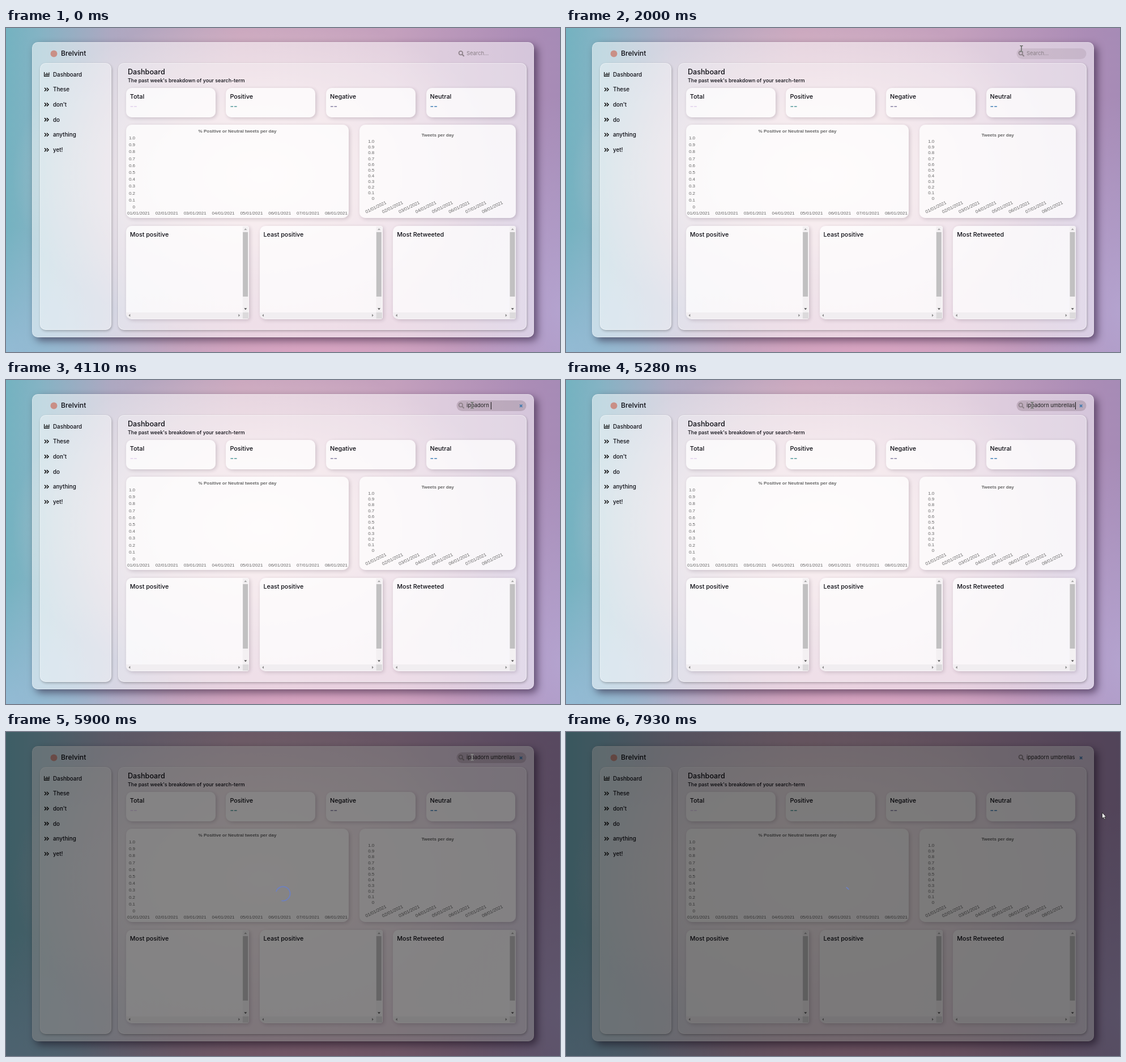
These frames come from a looping animation (978 px wide and 573 px high, 8000 ms). An HTML page:

```html
<!DOCTYPE html>
<html lang="en">
<head>
<meta charset="utf-8">
<title>Dashboard</title>
<style>
html, body { margin: 0; width: 100%; height: 100%; overflow: hidden; }
body {
  background:
    radial-gradient(440px 290px at 450px 260px, #fae0dff0, #f6d8da00),
    radial-gradient(420px 130px at 540px 573px, #e0a5c4b0, #e0a5c400),
    radial-gradient(300px 220px at 0 573px, #9dbddac0, #9dbdda00),
    radial-gradient(200px 380px at 978px 500px, #b7a8d4d0, #b7a8d400),
    linear-gradient(90deg, #74b2c0, #84b3c4 6%, #ada8c1 19%, #c6a2bb 42%, #c4a0bd 70%, #ab8cb6 94%, #a68bb6);
}
.panel, svg, #shade { position: absolute; box-sizing: border-box; }
svg { left: 0; top: 0; overflow: visible; }
.ui { font-family: Inter, "Open Sans", sans-serif; font-weight: 500; }
.chart { font-family: "Liberation Sans", Arial, sans-serif; font-size: 8px; fill: #666; }
.bold { font-weight: 700; }
.search { font-size: 9.4px; font-weight: 400; }
.line { fill: none; stroke: #111; }
#shade { inset: 0; background: #000; }
#beam { mix-blend-mode: difference; }
</style>
</head>
<body>
<svg id="scene" width="978" height="573"></svg>
<div id="shade"></div>
<svg id="spinner" width="978" height="573">
  <circle id="arc" cx="489" cy="286" r="12.6" fill="none" stroke="#6c80c6" stroke-width="1.8" stroke-linecap="round" pathLength="360"/>
</svg>
<svg id="beam" width="8" height="12">
  <path d="M-2.5 .5H-.7L0 1.2 .7 .5H2.5M0 1V10.5M-2.5 11H-.7L0 10.3 .7 11H2.5" fill="none" stroke="#fff"/>
</svg>
<svg id="arrow" width="10" height="14">
  <path d="M.5 .5V11L2.9 8.8 4.6 12.6 6.3 11.9 4.6 8.2H7.6Z" fill="#fff" stroke="#222" stroke-width=".9"/>
</svg>
<script>
const LOOP = 8000;
const $ = id => document.getElementById(id);
const scene = $('scene');

function panel(x, y, w, h, white, extra) {
  const div = document.createElement('div');
  div.className = 'panel';
  div.style.cssText = `left:${x}px;top:${y}px;width:${w}px;height:${h}px;border-radius:10px;` +
    `background:rgba(255,255,255,${white});${extra}`;
  scene.before(div);
}

function add(tag, attrs, content = '') {
  const node = document.createElementNS('http://www.w3.org/2000/svg', tag);
  for (const key in attrs) node.setAttribute(key, attrs[key]);
  node.textContent = content;
  return scene.appendChild(node);
}
const label = (x, y, size, content, fill = '#0b0b12') =>
  add('text', { x, y, fill, class: 'ui', 'font-size': size }, content);
const chartText = (x, y, anchor, content, more) =>
  add('text', { x, y, 'text-anchor': anchor, class: 'chart', ...more }, content);
const rect = (x, y, width, height, fill) => add('rect', { x, y, width, height, fill });
const line = (d, width, stroke = '#111') =>
  add('path', { d, class: 'line', 'stroke-width': width, style: `stroke:${stroke}` });
const fill = (d, color) => add('path', { d, fill: color });

// Window, sidebar and main area
const rim = 'border:1px solid rgba(255,255,255,.45);box-shadow:1px 2px 4px rgba(0,0,0,.25)';
const soft = 'box-shadow:2px 2px 6px rgba(60,40,60,.2)';
panel(46, 25, 886, 521.5, .5, 'border:1px solid rgba(255,255,255,.35);box-shadow:6px 6px 14px rgba(20,0,30,.5)');
panel(59.5, 62, 126.5, 471.5, .35, rim);
panel(197.5, 62, 721.5, 471.5, .27, rim);

add('circle', { cx: 84.5, cy: 45.5, r: 6, fill: '#c98f86' });
label(97, 49.3, 12.2, 'Brelvint');

['Dashboard', 'These', "don't", 'do', 'anything', 'yet!'].forEach((name, i) => {
  const y = 82 + i * 26.7;
  label(83, y + 3.5, 9.8, name);
  if (i) line(`M68 ${y - 3}l3 3 -3 3M72 ${y - 3}l3 3 -3 3`, 1.5);
  else line(`M67.6 ${y - 4}v7.4h9M70 ${y + 2}v-3M72 ${y + 2}v-5M74 ${y + 2}v-3.5M76 ${y + 2}v-5.5`, 1.2);
});

label(215, 82, 12.6, 'Dashboard');
label(215, 95.8, 8.9, "The past week's breakdown of your search-term");

// Totals
[['Total', '#e3d3ee'], ['Positive', '#62a1a3'], ['Negative', '#908aab'], ['Neutral', '#5089bb']].forEach(([name, color], i) => {
  const x = 211.8 + i * 176.6;
  panel(x, 106, 157.8, 52, .75, soft);
  label(x + 7, 125, 10.8, name);
  label(x + 7, 143, 14, '--', color).classList.add('bold');
});

// Empty charts
const dates = Array.from({ length: 8 }, (_, i) => `0${i + 1}/01/2021`);
function axis(right, top, step) {
  for (let i = 0; i <= 10; i++)
    chartText(right, top + i * step + 3, 'end', i < 10 ? (1 - i / 10).toFixed(1) : '0');
}
panel(211.8, 171, 392.8, 165, .75, soft);
panel(624, 171, 275.6, 165, .75, soft);
chartText(408.5, 185.2, 'middle', '% Positive or Neutral tweets per day').classList.add('bold');
chartText(762, 191.7, 'middle', 'Tweets per day').classList.add('bold');
axis(228, 194, 12.2);
axis(650.3, 200.3, 10.08);
dates.forEach((date, i) => {
  chartText(234 + i * 49.85, 329.8, 'middle', date);
  const x = 672 + i * 29.4;
  chartText(x, 310.5, 'end', date, { transform: `rotate(-26 ${x} 310.5)` });
});

// Lists with scrollbars
['Most positive', 'Least positive', 'Most Retweeted'].forEach((name, i) => {
  const x = 211.8 + i * 235.7, bar = x + 206;
  panel(x, 349.5, 217, 165, .75, soft + ';border-radius:10px 4px 4px 10px');
  label(x + 7, 368.5, 10.7, name);
  rect(bar, 351, 10, 152, '#f3f0f2');
  fill(`M${x} 503H${bar}V514H${x + 8}Q${x + 2} 513 ${x} 503`, '#f1eef1');
  rect(bar, 503, 10.5, 11, '#dcdadc');
  rect(bar + .3, 361, 9, 114, '#c1c0c1');
  fill(`M${bar + 2.5} 357.3h5l-2.5 -3z`, '#a3a3a3');
  fill(`M${bar + 2.5} 495.6h5l-2.5 3z`, '#505050');
  fill(`M${x + 7.5} 505.8v5l-2.8 -2.5z`, '#8a8a8a');
  fill(`M${bar - 7.5} 505.8v5l2.8 -2.5z`, '#8a8a8a');
});

// Search field
const pill = add('rect', { x: 795.5, y: 36, width: 123, height: 19, rx: 9.5, fill: 'rgba(110,90,105,.27)' });
add('circle', { cx: 802.8, cy: 44.2, r: 3.3, fill: 'none', stroke: '#8d8189', 'stroke-width': 1.7 });
line('M805.3 46.7L808.6 50', 2, '#8d8189');
const field = label(813, 48.3, 9.4, '');
field.classList.add('search');
field.style.whiteSpace = 'pre';
const caret = rect(0, 39, 1, 13, '#111');
const clear = line('M907 43.6l4.4 4.4M911.4 43.6l-4.4 4.4', 1.6, '#3f78ad');

const QUERY = 'ippadorn umbrellas';
const KEY_TIMES = [3020, 3250, 3410, 3480, 3720, 3800, 3870, 3950, 4110, 4260,
  4420, 4650, 4810, 4960, 5040, 5200, 5280, 5280];
const FOCUS = 2540;

// Pointer waypoints: time, x, y
const POINTER = [[670, 915, 551], [900, 800, 450], [1220, 621, 290], [1380, 656, 202], [1450, 654, 149],
  [1680, 705, 30], [1800, 755, 10], [2080, 823, 39], [5930, 823, 39],
  [6250, 905, 95], [6600, 941, 138], [7930, 946, 142], [8000, 946, 142]];

const clamp = v => Math.min(1, Math.max(0, v));
const ramp = (t, start, length) => clamp((t - start) / length);
const easeInOut = p => p * p * (3 - 2 * p);

function pointerAt(t) {
  const i = Math.max(1, POINTER.findIndex(p => p[0] > t));
  const [t0, x0, y0] = POINTER[i - 1], [t1, x1, y1] = POINTER[i];
  const p = ramp(t, t0, t1 - t0);
  return [x0 + (x1 - x0) * p, y0 + (y1 - y0) * p];
}

function drawSearch(t) {
  const typed = KEY_TIMES.filter(k => k <= t).length;
  const content = typed ? QUERY.slice(0, typed) : 'Search...';
  if (field.textContent !== content) field.textContent = content;
  field.setAttribute('fill', typed ? '#222' : '#8b8088');
  const lastInput = typed ? KEY_TIMES[typed - 1] : FOCUS;
  const caretOn = t >= FOCUS && Math.floor((t - lastInput) / 500) % 2 === 0;
  caret.setAttribute('opacity', caretOn ? 1 : 0);
  caret.setAttribute('x', 813 + (typed ? field.getComputedTextLength() + .5 : 0));
  clear.setAttribute('opacity', typed ? 1 : 0);
  pill.setAttribute('opacity', ramp(t, 1920, 150) - ramp(t, 5960, 150));
}

// The arc grows, then its tail catches up, while the whole ring turns
function drawSpinner(t) {
  let start = 0, length = 258, turn = 200;
  if (t > 5980) {
    const clock = t - 310;
    const phase = clock % 1500 / 750;
    const grow = easeInOut(clamp(phase)), chase = easeInOut(clamp(phase - 1));
    start = 115 * grow + 229 * chase;
    length = Math.min(3 + 255 * grow, 360 - start);
    turn = clock * .18;
  }
  $('arc').setAttribute('stroke-dasharray', `${length} ${360 - length}`);
  $('arc').setAttribute('transform', `rotate(${start + turn} 489 286)`);
}

function draw(t) {
  drawSearch(t);
  drawSpinner(t);
  const fade = ramp(t, 5762, 150);
  $('shade').style.opacity = .51 * fade;
  $('spinner').style.opacity = fade;
  const [x, y] = pointerAt(t);
  const overField = t >= 2000 && t < 5940;
  for (const [id, shown] of [['beam', overField], ['arrow', !overField && t >= 670]]) {
    $(id).style.left = x + 'px';
    $(id).style.top = y + 'px';
    $(id).style.display = shown ? 'block' : 'none';
  }
}

const begin = performance.now();
function frame() {
  draw((performance.now() - begin) % LOOP);
  requestAnimationFrame(frame);
}
frame();
</script>
</body>
</html>
```
